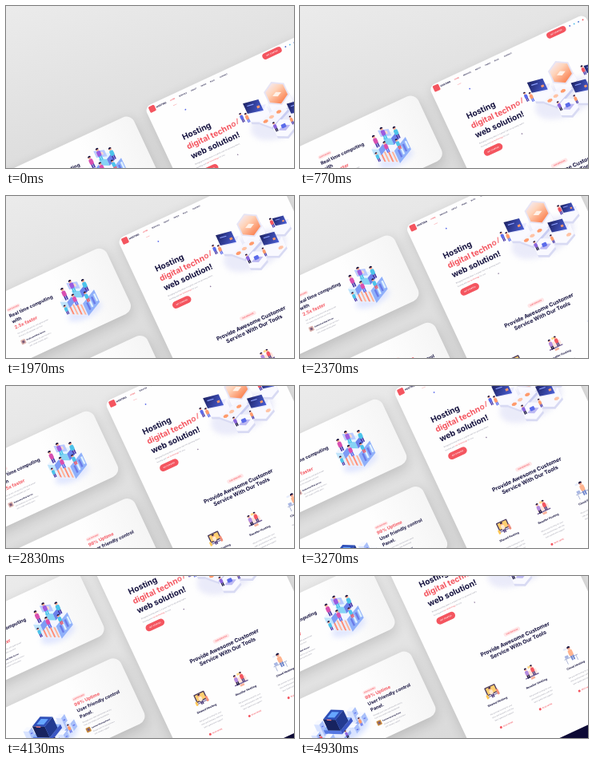
An HTML page for the animation above (4.96 s loop, 360 by 203 pixels).

```html
<!DOCTYPE html>
<html lang="en">
<head>
<meta charset="utf-8">
<title>Hosting pages</title>
<style>
html, body { margin: 0; width: 100%; height: 100%; overflow: hidden; background: #e4e4e4; }
svg { display: block; width: 100%; height: 100%; }
text { font-family: Inter, "Open Sans", sans-serif; text-rendering: geometricPrecision; }
</style>
</head>
<body>
<svg viewBox="0 0 360 203" preserveAspectRatio="none">
  <defs>
    <linearGradient id="wall" x1="0" y1="0" x2=".5" y2="1">
      <stop offset="0" stop-color="#ebebeb"/><stop offset="1" stop-color="#dadada"/>
    </linearGradient>
    <linearGradient id="paper">
      <stop offset=".75" stop-color="#fefefe"/><stop offset="1" stop-color="#f5f5f5"/>
    </linearGradient>
    <linearGradient id="screen" x1="0" y1="0" x2="1" y2="1">
      <stop offset="0" stop-color="#1d2263"/><stop offset="1" stop-color="#4a5fd6"/>
    </linearGradient>
    <linearGradient id="glow" x1="0" y1="0" x2=".3" y2="1">
      <stop offset="0" stop-color="#f3eefb"/><stop offset=".45" stop-color="#ffd3b8"/><stop offset="1" stop-color="#fb8a5c"/>
    </linearGradient>
    <linearGradient id="ice" x1="0" y1="0" x2="1" y2="1">
      <stop offset="0" stop-color="#eef2ff"/><stop offset="1" stop-color="#a9bdfa"/>
    </linearGradient>
    <filter id="soft" x="-20%" y="-20%" width="140%" height="140%"><feGaussianBlur stdDeviation="8"/></filter>
    <filter id="haze" x="-50%" y="-50%" width="200%" height="200%"><feGaussianBlur stdDeviation="3"/></filter>
  </defs>
  <rect width="360" height="203" fill="url(#wall)"/>
  <g id="scene"></g>
</svg>
<script>
const INK = '#15123f', RED = '#f4555f', GREY = '#9a9aa8', ORANGE = '#ff9a6b', BLUE = '#5b6bea', LILAC = '#d8daf3';
const CYAN = '#4cc3ea', PINK = '#d94fb0', VIOLET = '#4a3aa7';

const rect = (x, y, w, h, fill, r = 0, extra = '') =>
  `<rect x="${x}" y="${y}" width="${w}" height="${h}" rx="${r}" fill="${fill}" ${extra}/>`;
const dot = (x, y, r, fill) => `<circle cx="${x}" cy="${y}" r="${r}" fill="${fill}"/>`;
const poly = (points, fill) => `<polygon points="${points}" fill="${fill}"/>`;
const text = (x, y, size, str, fill = INK, weight = 700, anchor = 'start') =>
  `<text x="${x}" y="${y}" font-size="${size}" font-weight="${weight}" fill="${fill}" text-anchor="${anchor}">${str}</text>`;
const lines = (x, y, step, size, rows, anchor) =>
  rows.map((row, i) => text(x, y + i * step, size, row, GREY, 400, anchor)).join('');
const at = (x, y, scale, body) => `<g transform="translate(${x} ${y}) scale(${scale})">${body}</g>`;

const pill = (cx, cy, w, h, fill, str, color, size = 2.3) =>
  rect(cx - w / 2, cy - h / 2, w, h, fill, h / 2) + text(cx, cy + size * .36, size, str, color, 600, 'middle');

const card = (x, y, w, h, r, fill) =>
  rect(x, y + 5, w, h, '#000', r, 'opacity=".15" filter="url(#soft)"') + rect(x, y, w, h, fill, r);
const sideCard = y => card(-320, y, 301, 89.5, 11, 'url(#paper)');

function hexagon(cx, cy, r, fill, squash = .82) {
  const points = [];
  for (let i = 0; i < 6; i++) {
    const a = Math.PI * (i / 3 + 1 / 6);
    points.push((cx + r * Math.cos(a)).toFixed(1) + ',' + (cy + r * squash * Math.sin(a)).toFixed(1));
  }
  return poly(points.join(' '), fill);
}
const pad = (x, y, r) => hexagon(x, y + 3, r, LILAC) + hexagon(x, y, r, '#f9f9ff');

// Isometric block: (x, y) is the front corner of the top face.
const block = (x, y, w, h, top, left, right) => {
  const d = w / 2;
  return poly(`${x},${y} ${x - w},${y - d} ${x},${y - w} ${x + w},${y - d}`, top) +
    poly(`${x},${y} ${x - w},${y - d} ${x - w},${y - d + h} ${x},${y + h}`, left) +
    poly(`${x},${y} ${x + w},${y - d} ${x + w},${y - d + h} ${x},${y + h}`, right);
};

const laptop = (x, y, w = 18) => at(x, y, w / 18,
  poly('-9,5 7,9 13,3 -2,0', '#e9eaff') + poly('-9,-8 8,-5 8,8 -9,4', 'url(#screen)') +
  poly('-6,-4 1,-3 1,-2 -6,-3', '#8fa2ff') + rect(3, 1, 3, 2.5, ORANGE));

const person = (x, y, shirt, legs, scale = 1) => at(x, y, scale,
  rect(-1.5, 1.5, 1.3, 5, legs, .5) + rect(.3, 1.5, 1.3, 5, legs, .5) +
  rect(-2, -3, 4, 5.5, shirt, 1.5) + dot(0, -4.5, 1.4, '#f3a58c') +
  `<path d="M-1.5 -4.6A1.5 1.5 0 0 1 1.5 -4.8Z" fill="${INK}"/>`);

function header() {
  const items = [['HOME', 36], ['SERVICES', 50.3], ['ABOUT', 65.3], ['PAGES', 78.8], ['BLOG', 91], ['CONTACT', 106.5]];
  return rect(4.2, 1.8, 8, 8, RED, 1.5) + text(13.5, 7, 3, 'HOSTING') +
    items.map(([name, x], i) => text(x, 6.6, 2.2, name, i ? INK : RED, 600, 'middle')).join('') +
    rect(33.5, 13, 5, .6, '#fbb3b8') +
    pill(173.3, 5.8, 26, 8, RED, 'GET STARTED', '#fff') +
    ['#4b63c9', '#49b7e8', '#3f6fd0', RED].map((c, i) => dot(192 + i * 6, 5.7, .9, c)).join('');
}

function heroArt() {
  const tile = (x, y, fill) => hexagon(x, y, 3.6, fill, .6);
  return `<ellipse cx="150" cy="86" rx="42" ry="22" fill="#e2e3f8" opacity=".7" filter="url(#haze)"/>` +
    pad(192, 72, 13) + laptop(194, 65, 15) +
    pad(157, 64, 17) + hexagon(157, 54, 16, '#e6e4f5', 1) + hexagon(157, 54, 14, 'url(#glow)', 1) +
    poly('151,55 157,52 163,55 157,58', '#fff1e7') +
    pad(126, 67, 15) + laptop(124, 57, 21) +
    poly('122,78 150,69 162,78 134,90', '#f6f6ff') + poly('122,78 134,90 134,93 122,81', LILAC) + poly('134,90 162,78 162,81 134,93', '#c9cdf2') +
    tile(130, 80, ORANGE) + tile(139, 78, '#ffc3a5') + tile(150, 76, ORANGE) +
    pad(174, 91, 16) + laptop(173, 80, 20) + tile(181, 96, '#ffc3a5') +
    pad(147, 97, 14) + poly('140,97 148,93 156,97 148,101', '#bdb9f2') + rect(145, 92, 6, 5, BLUE, 1) +
    person(105, 63, BLUE, VIOLET) + person(111, 66, ORANGE, BLUE) +
    person(184, 63, RED, VIOLET) + person(138, 91, '#8a63dc', INK) + person(160, 92, ORANGE, VIOLET, .9);
}

function hero() {
  const lifted = `digital tec<tspan rotate="-3" dy="-.5">h</tspan><tspan rotate="4" dy="-.7">n</tspan>` +
    `<tspan rotate="8" dy="-1" opacity=".85">o</tspan><tspan rotate="20" dx=".8" dy="-1" fill="#f88a8f">l</tspan>`;
  return dot(45.4, 24.2, .9, BLUE) +
    text(27.3, 58, 10.1, 'Hosting') + text(27.3, 71, 10.1, lifted, RED) + text(27, 84, 10.1, 'web solution!') +
    lines(27.3, 92.3, 4.8, 2.35, ['Bringing hosting ideas is a great start for growing teams', 'hosting and <tspan fill="' + RED + '">our technology</tspan> for you']) +
    pill(39.8, 105.7, 25, 9, RED, 'GET STARTED', '#fff') +
    dot(80.7, 103, .8, '#8d7a9c') + heroArt();
}

function service(x, name, art) {
  return at(x - 1, 213, .9, art) + text(x, 229.3, 3.55, name, INK, 700, 'middle') +
    lines(x, 240, 4.5, 2.3, ['We provide hosting for your', 'sites and business with the', 'best speed and support'], 'middle') +
    dot(x - 9.5, 259, 1.5, RED) + text(x - 6.5, 259.8, 2.3, 'READ MORE', RED, 500);
}

function services() {
  const shared = rect(-8, -8, 16, 12, '#4b3a5c', 1) + rect(-6.5, -6.5, 13, 9, '#ffcf70') + rect(-9, 5, 18, 1.5, '#8d7fae') +
    person(-1, 1, '#ffe9d0', '#4b3a78', 1.2) + rect(6, 0, 3, 8, '#f28f7a', 1) + rect(-10, 2, 3, 6, '#ffc857', 1);
  const reseller = rect(-8, -4, 17, 8, '#ffe3dc', 2) + rect(-10, 4, 20, 1.5, '#6d5a94') +
    person(-5, -2, '#b48be0', INK, 1.2) + person(4, -3, RED, '#51407f', 1.2) + rect(-1, -10, 4, 3, '#ffd98a') + rect(-3, 6, 6, 3, '#f9b29b');
  const cloud = rect(-10, 3, 20, 1, '#9aa5cc') + rect(-8, 4, .8, 7, '#9aa5cc') + rect(7, 4, .8, 7, '#9aa5cc') +
    person(2, -2, '#ffb48f', '#6f86cc', 1.6) + rect(-8, -1, 5, 4, '#a9b7e3', .5) + rect(-6, -11, 5, 2.6, '#e6ecfb', 1.3);
  return pill(107.5, 156, 22, 5, '#ffe6e7', 'OUR SERVICES', RED, 2.2) +
    text(107, 168.5, 6.85, 'Provide Awesome Customer', INK, 700, 'middle') +
    text(107.8, 176.5, 6.85, 'Service With Our Tools', INK, 700, 'middle') +
    service(54, 'Shared Hosting', shared) + service(108, 'Reseller Hosting', reseller) + service(162, 'Cloud Hosting', cloud) +
    rect(0, 302, 215, 100, '#0d0a35');
}

function feature(x, y, name, rows, tint) {
  return rect(x, y - 3, 6, 6, tint, 1) + rect(x + 1.5, y - 1.5, 3, 3, '#7a5a78') +
    text(x + 7.5, y + .3, 2.4, name) + lines(x + 7.5, y + 5, 3.8, 2.1, rows);
}

function speedArt() {
  let stripes = '';
  for (let i = 0; i < 4; i++) {
    const x = -13 + i * 4.5, y = 3 + i * 2.2;
    stripes += poly(`${x},${y} ${x + 2},${y + 1} ${x + 2},${y + 15} ${x},${y + 14}`, i % 2 ? '#ffb59a' : '#ff8f78') +
      rect(8 + i * 4.2, 11 - i * 2.1, 2.4, 10, i % 2 ? '#dff1ff' : '#6a7be8');
  }
  return `<ellipse cx="2" cy="20" rx="23" ry="9" fill="#d5deff" opacity=".7" filter="url(#haze)"/>` +
    block(4, 10, 20, 17, '#f4f6ff', '#e9eeff', '#8fb0fa') + stripes +
    block(-13, 0, 8, 8, '#f0f5ff', '#bfe4fb', '#7d9cf5') +
    block(7, -6, 9, 9, '#e3f4ff', '#86d3f5', '#6a80ea') +
    poly('-4,-22 9,-18 9,-9 -4,-13', '#b8c9ff') + poly('-2,-19 6,-17 6,-13 -2,-15', '#ffd9cb') +
    person(-12, -11, PINK, VIOLET, 1.3) + person(1, -16, '#9b5be0', CYAN, 1.3) +
    person(16, -10, CYAN, VIOLET, 1.3) + person(-3, 1, PINK, BLUE, 1.2) + person(12, 4, CYAN, RED, 1.1) + person(-18, 8, CYAN, VIOLET, 1);
}

function speedCard() {
  return sideCard(0) + pill(-154, 23, 18, 4.6, '#ffe6e7', 'OUR FEATURES', RED, 2) +
    text(-163, 32.7, 5.95, 'Real time computing') + text(-163, 40.5, 5.95, 'with') + text(-163, 48.4, 5.85, '2.5x faster', RED) +
    lines(-163, 55.5, 4, 2.2, ['Our servers run quickly with great power', 'for every site and plan you host']) +
    feature(-163.5, 67, 'Dedicated Web Server', ['Fast hardware for your business', 'with simple monthly plans'], '#dcb3ae') +
    at(-77, 45, 1, speedArt());
}

function panelArt() {
  const tower = (x, y, h) => block(x, y, 6, h, '#f7f9ff', '#d8e3ff', '#a9c0fa') + rect(x + 1.5, y + 3, 2.5, 1.2, BLUE);
  return `<ellipse cx="0" cy="17" rx="37" ry="15" fill="#c6d6ff" opacity=".7" filter="url(#haze)"/>` +
    block(0, 25, 34, 4, '#e8eeff', '#bccdfb', '#93acf2') +
    tower(-21, -3, 16) + tower(23, -1, 15) + tower(-30, 8, 13) + tower(31, 10, 10) +
    block(0, 15, 19, 5, '#8eb4ff', '#5678e2', '#3a56c4') +
    block(0, 0, 14, 15, '#2f4fb8', '#17235f', '#223a91') +
    poly('0,-3 -8,-7 0,-11 8,-7', '#66a6ff') + rect(-10, 0, 5, 1.4, '#ff7d7d', 0, 'transform="skewY(27)"') +
    tower(-16, 18, 9) + tower(17, 19, 8) +
    person(-26, 14, RED, VIOLET, .9) + person(27, 15, ORANGE, BLUE, .9) + person(5, 22, '#8a63dc', INK, .8);
}

function panelCard() {
  return sideCard(120.5) + pill(-85, 147.3, 18, 4.6, '#ffe6e7', 'OUR FEATURES', RED, 2) +
    text(-94, 156, 5.7, '99% Uptime', RED) + text(-94, 164.3, 5.8, 'User friendly control') + text(-94, 172.6, 5.8, 'Panel.') +
    lines(-94, 179, 4, 2.2, ['Manage your sites and domains easily', 'from one simple clear dashboard']) +
    feature(-94, 189.5, 'Control Hosting Panel', ['Simple tools for your business', 'with friendly support'], '#c98a3c') +
    at(-139, 163, 1, panelArt());
}

const scene = document.getElementById('scene');
scene.innerHTML = speedCard() + panelCard() + card(0, 0, 215, 420, 8, '#fefefe') + header() + hero() + services();

const LOOP = 4960;
const TRACK = [[0, 0], [770, 29], [1570, 62.5], [2370, 98.5], [3270, 134.5], [4130, 159.5], [LOOP, 169.1]];

function slope(i) {
  if (i === TRACK.length - 1) return 0;
  const a = TRACK[Math.max(i - 1, 0)], b = TRACK[i + 1];
  return (b[1] - a[1]) / (b[0] - a[0]);
}

// Smooth Hermite curve through the scroll positions.
function scrollAt(t) {
  let i = 0;
  while (i < TRACK.length - 2 && t > TRACK[i + 1][0]) i++;
  const [t0, s0] = TRACK[i], [t1, s1] = TRACK[i + 1];
  const span = t1 - t0, k = (t - t0) / span, k2 = k * k, k3 = k2 * k;
  return s0 + (s1 - s0) * (3 * k2 - 2 * k3) +
    span * (slope(i) * (k3 - 2 * k2 + k) + slope(i + 1) * (k3 - k2));
}

function draw(ms) {
  const step = Math.floor((ms % LOOP) * .03 + .15);
  const offset = scrollAt(Math.min(step / .03, LOOP));
  scene.setAttribute('transform', `translate(173 127) rotate(-25) translate(0 ${(-offset).toFixed(3)})`);
}

const start = performance.now();
function tick() {
  draw(performance.now() - start);
  requestAnimationFrame(tick);
}
draw(0);
requestAnimationFrame(tick);
</script>
</body>
</html>
```
